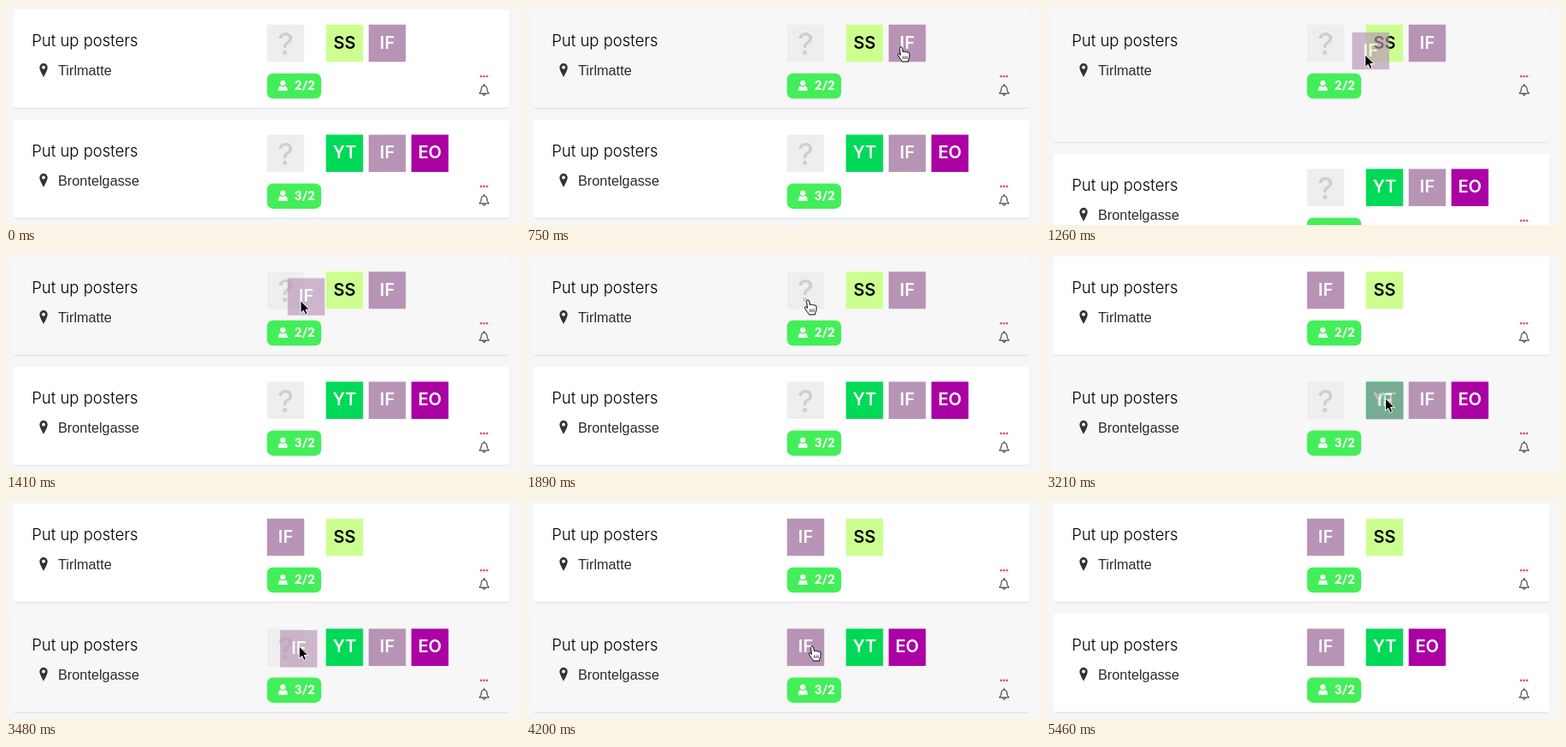
Animation, 602 px wide and 256 px high, one loop 5.79 s. Source, as an HTML page:

```html
<!DOCTYPE html>
<html lang="en">
<head>
<meta charset="utf-8">
<title>Drag and drop shifts</title>
<style>
  html, body { margin: 0; width: 100%; height: 100%; overflow: hidden; background: #f6f6f6; }
  svg { display: block; }
  text { font-family: Inter, sans-serif; }
  .title { font-size: 18.5px; font-weight: 300; }
  .place { font: 16.3px "Liberation Sans", Arial, sans-serif; fill: #2b2b2b; }
  .count { font: 900 14.5px Lato, sans-serif; fill: #fff; }
  .label { font-size: 20px; font-weight: 600; text-anchor: middle; }
  .empty .label { font-size: 36px; font-weight: 500; }
</style>
</head>
<body>
<svg width="602" height="256" viewBox="0 0 602 256">
  <defs>
    <g id="icons">
      <path fill="#333" fill-rule="evenodd" d="M44 83Q39.3 75 39.3 71.8a4.7 4.7 0 0 1 9.4 0Q48.7 75 44 83zM44 69.7a2 2 0 1 0 .01 0z"/>
      <rect x="305.7" y="78.7" width="63.5" height="29.5" rx="7" fill="#43ef58"/>
      <g fill="#fff">
        <circle cx="324.3" cy="90" r="3.1"/>
        <path d="M318.8 99q0-5 2.8-5.6 2.7 2 5.4 0 2.8.6 2.8 5.6z"/>
      </g>
      <g fill="#d9505f">
        <circle cx="556.3" cy="82.2" r="1.3"/><circle cx="559.8" cy="82.2" r="1.3"/><circle cx="563.3" cy="82.2" r="1.3"/>
      </g>
      <path fill="none" stroke="#222" stroke-linejoin="round" d="M554.3 102.2q2.3-2 2.3-5 0-4 3.4-4.2 3.4.2 3.4 4.2 0 3 2.3 5zM558.5 102.7a1.5 1.7 0 0 0 3 0M560 91v2"/>
    </g>
  </defs>
  <g id="cards"></g>
  <g id="ghost" opacity=".65"></g>
  <g id="cursor">
    <path id="arrow" stroke="#fff" d="M0 0V14.5L3.4 11.5 5.6 16.6 8.2 15.5 6 10.5H10.5z"/>
    <g id="hand" fill="#fff" stroke="#000" stroke-linejoin="round">
      <path d="M-1.6 9.5L-2.3 1.4a1.5 1.5 0 0 1 2.9-.5L1.6 5.8a1.4 1.4 0 0 1 2.5.3 1.4 1.4 0 0 1 2.6.6 1.3 1.3 0 0 1 2.4.8v3.6q0 2-1.4 4.2V17H.6q-1-2-2.6-3.6L-4.4 9.6q-.6-1.8 1-1.9z"/>
      <path stroke-width=".8" d="M1.8 10.5v3.5M4 10.5v3.5M6.2 10.5v3.5"/>
    </g>
  </g>
</svg>
<script>
const LOOP = 5790, CARD_HEIGHT = 115, DROP_SPACE = 40;
const $ = id => document.getElementById(id);
const COLORS = {
  '?': ['#eee', '#cfcfcf'], SS: ['#ccff90', '#000'], IF: ['#b794b6', '#fff'],
  YT: ['#00d957', '#fff'], EO: ['#ab00a4', '#fff']
};

function tile(label, x, y, name = '') {
  const [fill, ink] = COLORS[label], empty = label === '?';
  return `<g class="${name} ${empty ? 'empty' : ''}">
    <rect x="${x - 0.25}" y="${y - 0.25}" width="43.5" height="43.5" fill="${fill}"/>
    <text class="label" x="${x + 21.5}" y="${y + (empty ? 35 : 27.7)}" fill="${ink}">${label}</text></g>`;
}

// Times: drag from start to drop, then update; hover from enter to leave.
const cards = [
  { y: 0, place: 'Tirlmatte', count: '2/2', tiles: ['SS', 'IF'], grab: [15, 26],
    drag: 1020, drop: 1560, update: 1920, enter: 280, leave: 2380 },
  { y: 128.7, place: 'Brontelgasse', count: '3/2', tiles: ['YT', 'IF', 'EO'], grab: [22, 18.5],
    drag: 3060, drop: 3660, update: 4110, enter: 2430, leave: 4890 }
];

$('cards').innerHTML = cards.map(c => `<g class="card">
  <rect class="body" x="9" y="5.2" width="580" rx="2" fill="#e2e2e2"/>
  <rect class="body face" x="9" y="4" width="580" rx="2"/>
  <text class="title" x="30.2" y="47">Put up posters</text>
  <text class="place" x="61" y="81">${c.place}</text>
  <use href="#icons"/>
  <text class="count" x="338" y="98">${c.count}</text>
  ${tile('?', 306, 22)}${tile('IF', 306, 22, 'filled')}
  ${c.tiles.map((label, i) => tile(label, 375 + 50 * i, 22, label)).join('')}
</g>`).join('');
$('ghost').innerHTML = tile('IF', 0, 0);

cards.forEach((c, i) => {
  c.node = document.querySelectorAll('.card')[i];
  c.find = name => c.node.querySelector('.' + name);
});

// Pointer moves: start, end, from x, y, to x, y, ease-out power.
const moves = [
  [240, 750, 587, 110, 440, 48, 2],
  [1020, 1260, 440, 48, 374, 57, 1.2],
  [1260, 1560, 374, 57, 331, 55, 1.6],
  [2190, 2640, 331, 55, 466, 166, 1.5],
  [2640, 2760, 466, 166, 447, 169, 2],
  [3060, 3600, 447, 169, 336, 171, 1.8],
  [4800, 4940, 336, 171, 365, 310, 0.5]
];
const handTimes = [[530, 1020], [1560, 2220], [2510, 3060], [3660, 4850]];

const clamp = v => Math.min(1, Math.max(0, v));
const within = (t, from, to) => t >= from && t < to;
const show = (node, on) => node.setAttribute('visibility', on ? 'visible' : 'hidden');
const move = (node, x, y) => node.setAttribute('transform', `translate(${x} ${y})`);

function pointerAt(t) {
  const [start, end, x0, y0, x1, y1, power] = moves.findLast(m => t >= m[0]) || moves[0];
  const p = 1 - (1 - clamp((t - start) / (end - start))) ** power;
  return [x0 + (x1 - x0) * p, y0 + (y1 - y0) * p];
}

function draw(t) {
  const [px, py] = pointerAt(t);
  const dragged = cards.find(c => within(t, c.drag, c.drop));
  let shift = 0;

  for (const c of cards) {
    const extra = c === dragged && px > 349 && t > c.drag + 30 ? DROP_SPACE : 0;
    const hover = clamp((t - c.enter) / 150) - clamp((t - c.leave) / 150);
    const shade = Math.round(255 - 8 * hover);
    const updated = t >= c.update;

    move(c.node, 0, c.y + shift);
    c.node.querySelectorAll('.body').forEach(r => r.setAttribute('height', CARD_HEIGHT + extra));
    c.find('face').setAttribute('fill', `rgb(${shade},${shade},${shade})`);
    show(c.find('filled'), updated);
    show(c.find('IF'), !updated);
    if (c.find('EO')) move(c.find('EO'), updated ? -50 : 0, 0);
    shift += extra;
  }

  show($('ghost'), dragged);
  if (dragged) move($('ghost'), px - dragged.grab[0], py - dragged.grab[1]);

  const visible = within(t, 240, 4940);
  const hand = handTimes.some(([from, to]) => within(t, from, to));
  move($('cursor'), px, py);
  show($('hand'), visible && hand);
  show($('arrow'), visible && !hand);
}

const begin = performance.now();
function tick() {
  draw((performance.now() - begin) % LOOP);
  requestAnimationFrame(tick);
}
tick();
</script>
</body>
</html>
```
